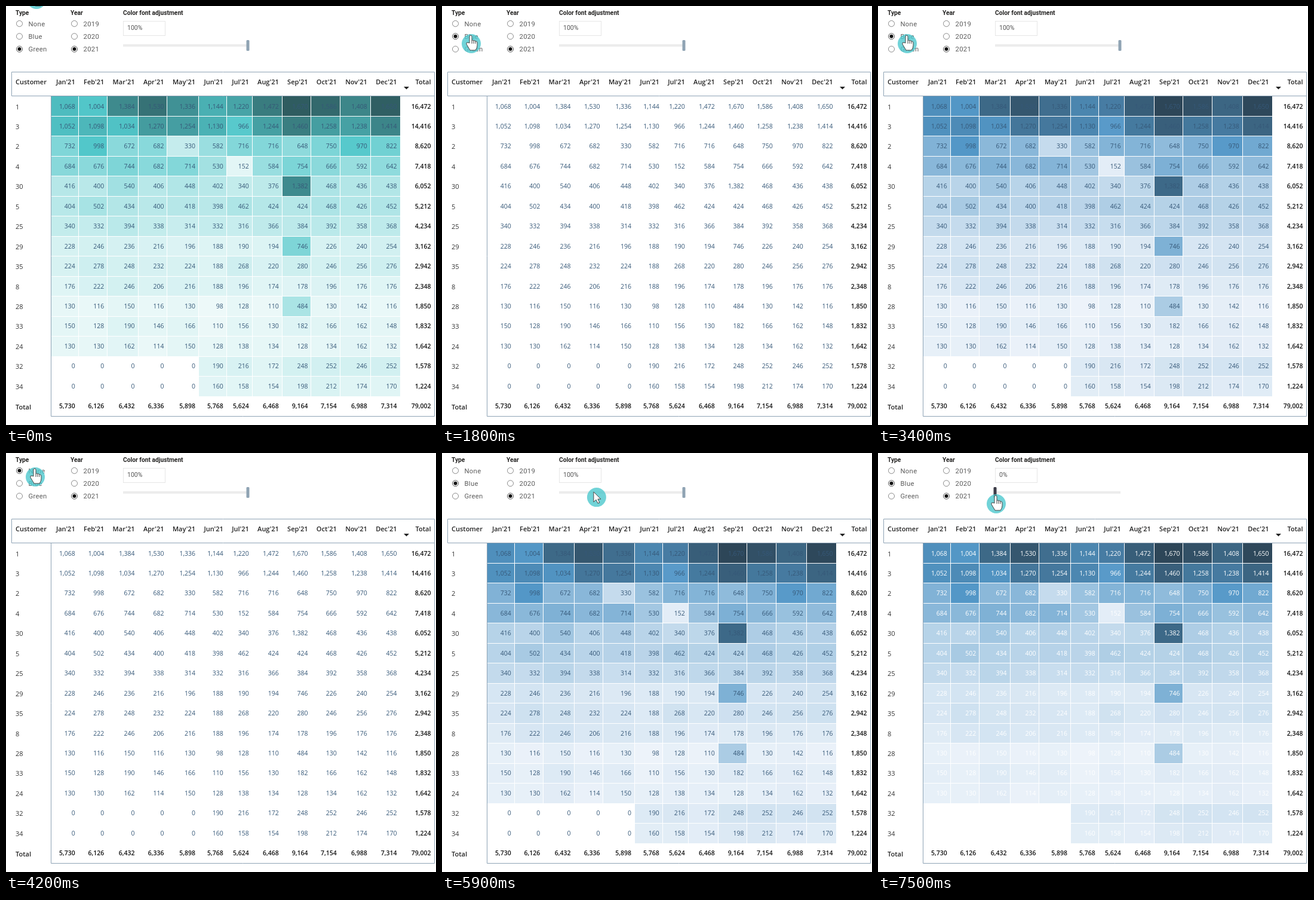
Animation of 720x701 px, one loop 8000 ms. Source, as an HTML page with a canvas:

```html
<!DOCTYPE html>
<html lang="en">
<head>
<meta charset="utf-8">
<title>Heat table with colour type and font adjustment</title>
<style>
  html, body { margin: 0; height: 100%; overflow: hidden; background: #fff; }
  canvas { display: block; }
</style>
</head>
<body>
<canvas id="stage" width="720" height="701"></canvas>
<script>
const ctx = document.getElementById('stage').getContext('2d');
const LOOP = 8000, STEP = 100;
const NUMBER = '10.5px "Open Sans", sans-serif';
const BOLD = '600 10.5px "Open Sans", sans-serif';
const HEAD = '600 11px "Open Sans", sans-serif';
const LABEL = '11px "Open Sans", sans-serif';
const TITLE = '600 10.25px Roboto, sans-serif';
const OPTION = '11.3px Roboto, sans-serif';

const LEFT = 75, RIGHT = 660, TOP = 150.5, ROW = 33.5, TOTAL_X = 711.5;
const types = ['None', 'Blue', 'Green'];
const months = 'Jan Feb Mar Apr May Jun Jul Aug Sep Oct Nov Dec'.split(' ');
const ids = [1, 3, 2, 4, 30, 5, 25, 29, 35, 8, 28, 33, 24, 32, 34];
const rowTotals = [16472, 14416, 8620, 7418, 6052, 5212, 4234, 3162, 2942, 2348,
  1850, 1832, 1642, 1578, 1224];
const columnTotals = [5730, 6126, 6432, 6336, 5898, 5768, 5624, 6468, 9164, 7154, 6988, 7314];
const peaks = {
  '1 Jan': 1068, '1 Feb': 1004, '1 Jun': 1144, '1 Sep': 1670,
  '3 Jan': 1052, '3 Feb': 1098, '3 Mar': 1034, '3 Jul': 966,
  '2 Feb': 998, '2 May': 330, '2 Nov': 970, '4 Jul': 152,
  '30 Sep': 1382, '29 Sep': 746, '28 Sep': 484
};

const sum = list => list.reduce((a, b) => a + b, 0);
const format = n => n.toLocaleString('en-US');
const clamp = (v, lo, hi) => Math.min(hi, Math.max(lo, v));
const mix = (a, b, k) => a + (b - a) * k;

let seed = 7;
const random = () => (seed = seed * 16807 % 2147483647) / 2147483647;

// Seeded cells, scaled in turn by row and column until they meet both totals.
function fit(cells, total) {
  const free = cells.filter(c => !c.fixed);
  const k = (total - sum(cells.map(c => c.value))) / sum(free.map(c => c.value)) + 1;
  free.forEach(c => c.value *= k);
}
const cells = ids.map((id, r) => months.map((month, c) => {
  const peak = peaks[`${id} ${month}`], empty = r > 12 && c < 5;
  return { fixed: Boolean(peak), value: peak || (empty ? 0 : 0.85 + random() * 0.3) };
}));
for (let pass = 0; pass < 30; pass++) {
  columnTotals.forEach((total, c) => fit(cells.map(row => row[c]), total));
  rowTotals.forEach((total, r) => fit(cells[r], total));
}
const sales = cells.map(row => row.map(c => 2 * Math.round(c.value / 2)));

// Columns are as wide as their heading plus an equal padding.
ctx.font = HEAD;
const headWidths = months.map(m => ctx.measureText(m + "'21").width);
const padding = (RIGHT - LEFT - sum(headWidths)) / 12;
const edges = [...months, ''].map((_, c) => LEFT + sum(headWidths.slice(0, c)) + c * padding);

// Low, middle and high colour of each scale
const scales = {
  Blue: [[240, 245, 251], [83, 151, 199], [45, 70, 88]],
  Green: [[240, 250, 250], [82, 199, 202], [47, 92, 96]]
};
function heat(value, [low, mid, high]) {
  const [a, b, k] = value < 1000
    ? [low, mid, clamp((value - 78) / 922, 0, 1)]
    : [mid, high, (value - 1000) / 670];
  return `rgb(${a.map((c, i) => Math.round(mix(c, b[i], k)))})`;
}

// Each visit to an option: pointer arrives, then the table recolours.
const visits = [
  { type: 'Green', arrive: -300, recolour: 0 },
  { type: 'None', arrive: 500, recolour: 800 },
  { type: 'Blue', arrive: 1400, recolour: 1900 },
  { type: 'Green', arrive: 2300, recolour: 2600 },
  { type: 'Blue', arrive: 3200, recolour: 3400 },
  { type: 'None', arrive: 4000, recolour: 4200 },
  { type: 'Blue', arrive: 4700, recolour: 5000 }
];
const typeAt = t => visits.filter(v => v.recolour <= t).pop().type;

const moves = visits.slice(1).map(({ type, arrive }) =>
  ({ start: arrive - 300, end: arrive, x: 49, y: 40 + 23 * types.indexOf(type) }));
moves.push({ start: 5400, end: 6300, x: 409, y: 82 }, { start: 6400, end: 6690, x: 198, y: 85 });

function pointerAt(t) {
  let x = 51, y = -11;
  for (const m of moves) {
    const k = clamp((t - m.start) / (m.end - m.start), 0, 1), ease = k * k * (3 - 2 * k);
    x = mix(x, m.x, ease);
    y = mix(y, m.y, ease);
  }
  return [x, y];
}

function text(str, x, y, font, color, align = 'left', spacing = 0) {
  ctx.font = font;
  ctx.fillStyle = color;
  ctx.textAlign = align;
  ctx.letterSpacing = spacing + 'px';
  ctx.fillText(str, x, y);
}
function box(x, y, w, h, color) {
  ctx.fillStyle = color;
  ctx.fillRect(x, y, w, h);
}
function disc(x, y, r, color) {
  ctx.fillStyle = color;
  ctx.beginPath();
  ctx.arc(x, y, r, 0, 7);
  ctx.fill();
}
function handle(x, color) {
  ctx.fillStyle = color;
  ctx.beginPath();
  ctx.roundRect(x - 2.5, 57, 5, 18, 1.5);
  ctx.fill();
}
function radios(title, x, options, selected) {
  text(title, x, 15, TITLE, '#252423');
  options.forEach((name, i) => {
    const y = 29.5 + i * 21.3, on = name === selected;
    ctx.strokeStyle = on ? '#555' : '#888';
    ctx.lineWidth = 1;
    ctx.beginPath();
    ctx.arc(x + 6.5, y, 5, 0, 7);
    ctx.stroke();
    if (on) disc(x + 6.5, y, 3, '#111');
    text(name, x + 21.5, y + 4, OPTION, '#5c5c5c', 'left', 0.3);
  });
}

function drawTable(type, textColor) {
  const scale = scales[type];
  const column = c => edges[c + 1] - 5.5;
  text('Customer', 16, 131, HEAD, '#222');
  months.forEach((m, c) => text(m + "'21", column(c), 131, HEAD, '#222', 'right'));
  text('Total', TOTAL_X, 131, HEAD, '#222', 'right');
  ctx.fill(new Path2D('M666 135H675L670.5 139.5Z'));

  sales.forEach((values, r) => {
    const y = Math.floor(TOP + r * ROW), h = Math.floor(TOP + (r + 1) * ROW) - y;
    const base = Math.floor(172 + r * 33.45);
    text(ids[r], 16, base + 1, LABEL, '#333');
    values.forEach((v, c) => {
      const x = Math.floor(edges[c]) + 1, right = Math.floor(edges[c + 1]);
      if (scale && v) box(x, y + 1, right - x, h - 1, heat(v, scale));
      text(format(v), column(c), base, NUMBER, textColor, 'right');
    });
    text(format(rowTotals[r]), TOTAL_X, base, BOLD, '#111', 'right');
  });

  text('Total', 16, 675, HEAD, '#222');
  columnTotals.forEach((total, c) => text(format(total), column(c), 673, BOLD, '#111', 'right'));
  text(format(sum(rowTotals)), TOTAL_X, 673, BOLD, '#111', 'right');

  ctx.strokeStyle = '#8ea3b5';
  ctx.lineWidth = 1;
  ctx.stroke(new Path2D('M9.5 110.5H717.5V686.5H75.5V150.5M9.5 110.5V150.5H717.5'));
}

const hand = new Path2D('M-2 12V1Q-2-1 0-1T2 1V8Q4 6 5 8Q7 7 8 9Q10 8 11 11V16Q11 20 8 24H-1Q-4 19-7 14Q-8 11-5 11Z M2 8V13M5 8V13M8 9V13');
const arrow = new Path2D('M0 0V17L4 13L7 19L10 18L7 12H12Z');
function drawPointer(x, y, t) {
  const pressed = t >= 6400 && t < 7200;
  const pointing = t >= 5500 && t < 7200;
  const shape = pointing ? arrow : hand;
  disc(x, y, 16, 'rgba(78,200,206,.8)');
  if (pressed) {
    ctx.globalCompositeOperation = 'multiply';
    disc(x - 6, y - 9, 15, '#ffff66');
    ctx.globalCompositeOperation = 'source-over';
  }
  ctx.save();
  ctx.translate(...(pointing ? [x - 5, y - 9] : [x - 1, y - 13]));
  ctx.fillStyle = '#fff';
  ctx.strokeStyle = '#444';
  ctx.lineWidth = 1;
  ctx.fill(shape);
  ctx.stroke(shape);
  ctx.restore();
}

function draw(t) {
  const [x, y] = pointerAt(t);
  const dragging = t >= 6400;
  const knob = dragging ? clamp(x - 7, 196, 405) : 405;
  box(0, 0, 720, 701, '#fff');

  radios('Type', 16, types, typeAt(t + 100));
  radios('Year', 108, ['2019', '2020', '2021'], '2021');

  text('Color font adjustment', 196, 15, TITLE, '#252423');
  ctx.strokeStyle = '#e6e6e6';
  ctx.lineWidth = 1;
  ctx.strokeRect(196.5, 25.5, 70, 24);
  text(Math.round((knob - 196) / 2.09) + '%', 203, 40, '10.5px Roboto, sans-serif', '#555');
  box(196, 64, 210, 4, '#ececec');
  handle(knob, dragging ? '#3c3c48' : '#8fa3b3');

  drawTable(typeAt(t), t < 7300 ? '#365878' : '#fff');
  drawPointer(x, y, t);
}

function tick() {
  draw(Math.floor(performance.now() % LOOP / STEP) * STEP);
  requestAnimationFrame(tick);
}
tick();
</script>
</body>
</html>
```
